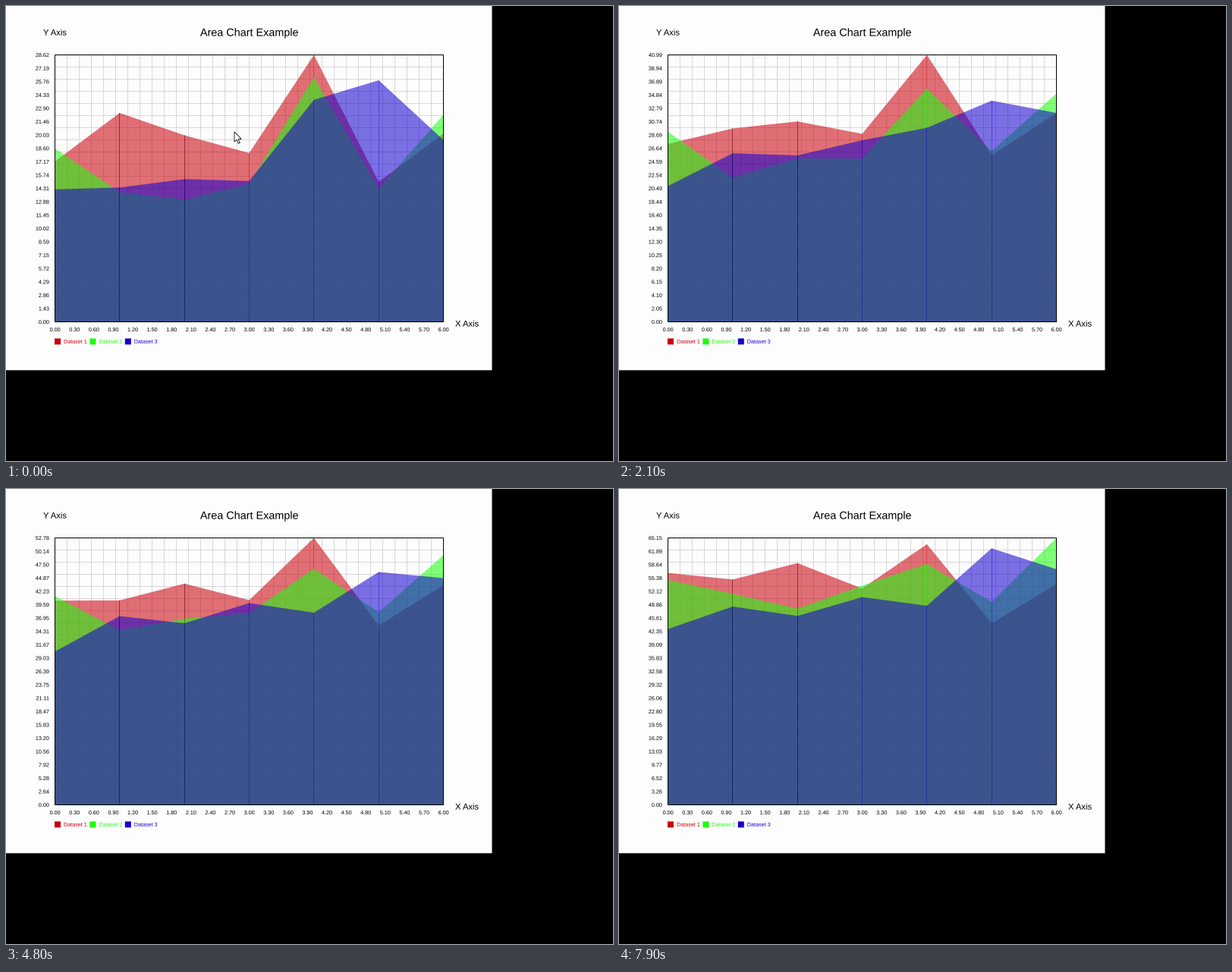
These frames come from a looping animation (800 by 600 pixels, 8 s). A matplotlib script:

```python
import numpy as np
import matplotlib.pyplot as plt
from matplotlib.animation import FuncAnimation
from matplotlib.patches import PathPatch, Polygon, Rectangle
from matplotlib.path import Path
from matplotlib.textpath import TextPath

plt.rcParams["font.family"] = "Liberation Sans"

PT = 0.72  # points per pixel at 100 dpi
LEFT, RIGHT, TOP, BOTTOM = 64.5, 576.5, 64.5, 416.5
FRAMES, INTERVAL = 80, 100
COLORS = ["#c8000a", "#1aff0c", "#1400d0"]
ALPHA = 0.56

# Three poses of the red, green and blue curves; values grow evenly between
POSES = np.array([
    [[17.2, 22.4, 20.0, 18.1, 28.62, 15.0, 20.2],
     [18.6, 13.9, 13.1, 14.8, 26.2, 14.3, 22.2],
     [14.2, 14.4, 15.3, 15.1, 23.8, 25.9, 19.5]],
    [[32.9, 33.7, 36.7, 34.8, 47.79, 31.4, 38.6],
     [35.0, 26.7, 31.7, 30.7, 41.1, 32.8, 42.1],
     [24.5, 32.2, 31.2, 34.9, 33.1, 38.4, 39.0]],
    [[56.6, 55.0, 59.0, 52.8, 63.6, 44.3, 53.9],
     [54.9, 51.5, 47.9, 53.5, 58.8, 49.5, 65.15],
     [42.9, 48.4, 46.1, 50.7, 48.6, 62.6, 57.5]],
])
MIDDLE = 35
PAUSES = [20, 23, 25, 28, 47, 59, 64, 67, 72, 75]  # no new data arrives

# Pointer visits as (frame, x, y) stops
VISITS = [
    [(0, 301, 166), (4, 340, 30), (8, 380, 433), (9, 385, 398),
     (14, 409, 95), (17, 425, 4)],
    [(33, 120, 452), (35, 62, 493), (36, 9, 530)],
]
ARROW = np.array([(0, 0), (0, 13), (3, 10.3), (5.3, 15.3),
                  (7.3, 14.4), (5, 9.5), (9.2, 9.5)])

steps = np.ones(FRAMES)
steps[[0] + PAUSES] = 0
ticks = np.cumsum(steps)
xs = np.linspace(LEFT, RIGHT, 7)

fig = plt.figure(figsize=(8, 6), dpi=100, facecolor="black")
ax = fig.add_axes([0, 0, 1, 1])
ax.set_xlim(0, 800)
ax.set_ylim(600, 0)
ax.axis("off")


def text_path(x, y, text, size, align=0.0):
    """Outline of a text; align is 0 for left, 0.5 for centre, 1 for right."""
    path = TextPath((0, 0), text, size=size)
    shift = x - align * path.get_extents().x1
    return Path(path.vertices * (1, -1) + (shift, y), path.codes)


def label(x, y, text, size, color="black", align=0.0):
    path = text_path(x, y, text, size, align)
    return ax.add_patch(PathPatch(path, fc=color, lw=0, zorder=6))


def box(x, y, w, h, **style):
    ax.add_patch(Rectangle((x, y), w, h, snap=False, **style))


def seam(color, alpha, zorder):
    return ax.plot([], [], color=color, alpha=alpha, lw=PT, zorder=zorder,
                   solid_capstyle="butt", snap=False)[0]


box(0, 0, 640.5, 480.3, fc="#fefdfe", lw=0, zorder=0)

grid = dict(color="#d8d5d8", lw=PT, zorder=1, snap=False)
ax.vlines(np.arange(LEFT + 16, RIGHT, 16), TOP, BOTTOM, **grid)
ax.hlines(np.arange(TOP + 16, BOTTOM, 16), LEFT, RIGHT, **grid)

areas, seams = [], []
for n, color in enumerate(COLORS):
    area = Polygon([(0, 0)] * 3, fc=color, alpha=ALPHA, lw=0, zorder=2 + n)
    areas.append(ax.add_patch(area))
    seams.append([seam(color, 0.4, 2 + n) for _ in xs[1:-1]])
dark_seams = [seam("black", 0.3, 4.5) for _ in range(2)]

box(LEFT, TOP, RIGHT - LEFT, BOTTOM - TOP, fc="none", ec="black", lw=PT,
    zorder=5)

label(320.4, 39.6, "Area Chart Example", 14.4, align=0.5)
label(49, 38.6, "Y Axis", 11.2)
label(592, 422.6, "X Axis", 11.2)
for i in range(21):
    label(LEFT + 25.6 * i, 429.1, f"{0.3 * i:.2f}", 7.2, align=0.5)
y_labels = [label(0, 0, "0", 7.2) for _ in range(21)]
for n, color in enumerate(COLORS):
    x = 64 + 46.4 * n
    box(x, 438.4, 8, 8, fc=color, lw=0, zorder=6)
    label(x + 12, 444.8, f"Dataset {n + 1}", 7.2, color)

pointer = ax.add_patch(Polygon(ARROW, fc="white", ec="black", lw=0.8 * PT,
                               zorder=9))


def values_at(frame):
    """Values of the three curves, shape (3, 7)."""
    now, middle, end = ticks[[frame, MIDDLE, -1]]
    if now < middle:
        return POSES[0] + (POSES[1] - POSES[0]) * now / middle
    return POSES[1] + (POSES[2] - POSES[1]) * (now - middle) / (end - middle)


def move_pointer(frame):
    pointer.set_visible(False)
    for stops in VISITS:
        t, x, y = zip(*stops)
        if t[0] <= frame <= t[-1]:
            tip = (np.interp(frame, t, x), np.interp(frame, t, y))
            pointer.set_xy(ARROW + tip)
            pointer.set_visible(True)


def draw(frame):
    values = values_at(frame)
    top = values.max()
    ys = BOTTOM - values / top * (BOTTOM - TOP)
    columns = np.floor(xs) + 0.5
    for area, lines, y in zip(areas, seams, ys):
        area.set_xy([(LEFT, BOTTOM), *zip(xs, y), (RIGHT, BOTTOM)])
        for p, line in enumerate(lines, 1):
            line.set_data([columns[p]] * 2, [BOTTOM, y[p]])
    for p, line in enumerate(dark_seams, 1):
        line.set_data([columns[p]] * 2, [BOTTOM, ys[:, p].min()])
    for i, patch in enumerate(y_labels):
        patch.set_path(text_path(56.6, BOTTOM + 2.6 - 17.6 * i,
                                 f"{top * i / 20:.2f}", 7.2, align=1))
    move_pointer(frame)
    return []


anim = FuncAnimation(fig, draw, frames=FRAMES, interval=INTERVAL,
                     init_func=lambda: draw(0), repeat=True, repeat_delay=0)
plt.show()
```
